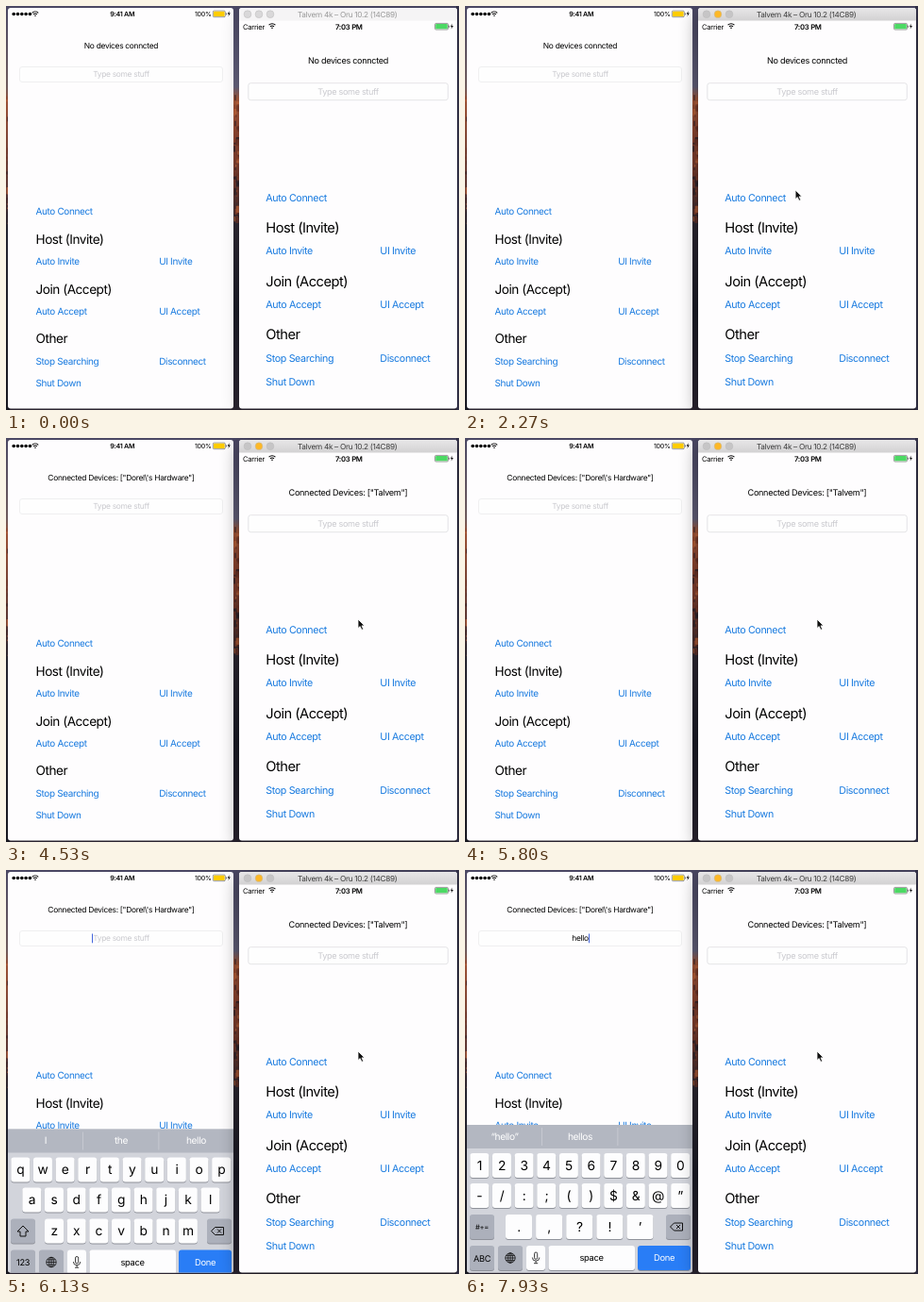
Recreate the animation shown at these times as an HTML page. Size 480x428 px, loop 8000 ms.

```html
<!DOCTYPE html>
<html lang="en">
<head>
<meta charset="utf-8">
<title>Auto connect demo</title>
<style>
  html, body { margin: 0; width: 100%; height: 100%; overflow: hidden; background: #1c1d29; }
  svg { display: block; width: 480px; height: 428px; }
  text { font-family: Inter, "Liberation Sans", sans-serif; letter-spacing: -.035em; text-rendering: geometricPrecision; white-space: pre; }
</style>
</head>
<body>
<svg id="stage" viewBox="0 0 480 428"></svg>
<script>
const LOOP = 8000;
const BLUE = '#1679df', HINT = '#c9c9ce';
const DEVICE = 'Talvem', OWNER = 'Dorel';

// Times in ms
const ACTIVATE = 1900, CONNECT = 3600, KEYBOARD_UP = 5830, SYMBOLS = 7700;
const PRESSES = [['h', 6440, 6530], ['e', 6710, 6800], ['l', 6970, 7080], ['l', 7180, 7270], ['o', 7400, 7490]];
const POINTER = [[950, 484, 120], [1450, 390, 180], [1800, 326, 203], [2050, 326, 203],
                 [2270, 350, 195], [2600, 373, 192]];
const SUGGESTIONS = [['I', 'the', 'hello'], ['“h”', 'hey', 'hello'], ['“he”', 'hello', 'hey'],
                     ['“hel”', 'hello', 'help'], ['“hell”', 'hello', 'hell'], ['“hello”', 'hellos', '']];

const escapeText = s => s.replace(/&/g, '&amp;').replace(/</g, '&lt;');
const text = (x, y, size, s, fill = '#000', attrs = '') =>
  `<text x="${x}" y="${y}" font-size="${size}" fill="${fill}" ${attrs}>${escapeText(s)}</text>`;
const centered = (x, y, size, s, fill, attrs = '') => text(x, y, size, s, fill, 'text-anchor="middle" ' + attrs);
const rect = (x, y, w, h, fill, r = 0, attrs = '') =>
  `<rect x="${x}" y="${y}" width="${w}" height="${h}" rx="${r}" fill="${fill}" ${attrs}/>`;
const circle = (x, y, r, fill, attrs = '') => `<circle cx="${x}" cy="${y}" r="${r}" fill="${fill}" ${attrs}/>`;
const path = (d, fill, attrs = '') => `<path d="${d}" fill="${fill}" ${attrs}/>`;
const gradient = (id, stops) => `<linearGradient id="${id}" x2="0" y2="1">` +
  stops.map(([at, color]) => `<stop offset="${at}" stop-color="${color}"/>`).join('') + '</linearGradient>';

const wifi = (x, y, s) => `<g transform="translate(${x} ${y}) scale(${s})" fill="none" stroke="#000" stroke-width="1.2">
  <path d="M-3.8-1.2a5.4 5.4 0 0 1 7.6 0M-2.2.6a3.1 3.1 0 0 1 4.4 0"/>${circle(0, 2.2, 0.9, '#000', 'stroke="none"')}</g>`;
const battery = (x, y, w, h, color) =>
  rect(x, y, w, h, '#fff', 1.2, 'stroke="#555" stroke-width=".6"') +
  rect(x + 0.7, y + 0.7, w - 1.4, h - 1.4, color, 0.6) +
  rect(x + w + 0.6, y + h / 2 - 1, 0.8, 2, '#555') +
  path(`M${x + w + 4.6} ${y}l-2.3 3.4h1.6l-.8 2.8 2.4-3.7h-1.7z`, '#000');

// Rocky speckle on the strips of wallpaper between the windows
function rocks() {
  let seed = 7;
  const random = () => (seed = seed * 16807 % 2147483647) / 2147483647;
  const colors = ['#c4683c', '#8f4229', '#3a2428', '#6d3327', '#20202b'];
  return Array.from({ length: 70 }, () => {
    const y = 94 + 136 * random();
    return rect((random() < 0.3 ? 0 : 241) + 4 * random(), y, 1 + 3 * random(), 2 + 6 * random(),
      colors[Math.floor(random() * colors.length)], 0.8, 'opacity=".7"');
  }).join('');
}

function screen({ left, right, rows, button, heading, label, mid, labelY, field, connected, id }) {
  const line = (i, x, s) => text(x, rows[i] + button * 0.36, button, s, BLUE);
  const head = (i, s) => text(left, rows[i] + heading * 0.36, heading, s);
  const [fx, fy, fw, fh, stroke] = field;
  return centered(mid, labelY, label, 'No devices conncted', '#000', `id="${id}Idle"`) +
    centered(mid, labelY, label, connected, '#000', `id="${id}Linked"`) +
    rect(fx, fy, fw, fh, '#fefefe', 2.5, `stroke="${stroke}" stroke-width=".8"`) +
    centered(mid, fy + fh / 2 + label * 0.34, label, 'Type some stuff', HINT, `id="${id}Hint"`) +
    line(0, left, 'Auto Connect') +
    head(1, 'Host (Invite)') + line(2, left, 'Auto Invite') + line(2, right, 'UI Invite') +
    head(3, 'Join (Accept)') + line(4, left, 'Auto Accept') + line(4, right, 'UI Accept') +
    head(5, 'Other') + line(6, left, 'Stop Searching') + line(6, right, 'Disconnect') +
    line(7, left, 'Shut Down');
}

// Keyboard, drawn at its resting place
const ROW_Y = [300, 332, 365, 398], KEY_H = 26, PITCH = 23.65;
const keyCap = (x, y, w, fill = '#fdfdfe') =>
  rect(x, y + 0.9, w, KEY_H, '#8f929a', 3) + rect(x, y, w, KEY_H, fill, 3);
const keyRow = (chars, firstX, row, pitch = PITCH, w = 20) => [...chars].map((c, i) => {
  const x = firstX + i * pitch;
  return keyCap(x - w / 2, ROW_Y[row], w) + centered(x, ROW_Y[row] + 17.8, 13.8, c);
}).join('');

function keyCenter(c) {
  const rows = [['qwertyuiop', 15.3], ['asdfghjkl', 27.3], ['zxcvbnm', 51]];
  const row = rows.findIndex(([chars]) => chars.includes(c));
  return [rows[row][1] + rows[row][0].indexOf(c) * PITCH, ROW_Y[row]];
}

const GREY = '#acb0bb';
const icon = 'stroke="#111" stroke-width="1" stroke-linejoin="round"';
const keyboard = `<g id="keyboard">
  ${rect(2, 270, 240, 160, '#d2d4db')}${rect(2, 270, 240, 25, '#b3b7c1')}
  ${rect(81, 273, 0.8, 19, '#cbced5')}${rect(161.5, 273, 0.8, 19, '#cbced5')}
  ${[42, 122, 201.5].map((x, i) => centered(x, 286, 10.2, '', '#fff', `id="suggest${i}"`)).join('')}
  ${keyCap(5, ROW_Y[2], 26, GREY)}${keyCap(213, ROW_Y[2], 26, GREY)}
  ${path('M221.5 374h9v8h-9l-4-4zM224 376l4 4m0-4l-4 4', 'none', icon)}
  <g id="letters">${keyRow('qwertyuiop', 15.3, 0)}${keyRow('asdfghjkl', 27.3, 1)}${keyRow('zxcvbnm', 51, 2)}
    ${path('M18 372.5l6 6h-3v5h-6v-5h-3z', 'none', icon)}</g>
  <g id="symbols">${keyRow('1234567890', 15.3, 0)}${keyRow('-/:;()$&@”', 15.3, 1)}${keyRow('.,?!’', 57, 2, 32.1, 28)}
    ${centered(18, 381, 7.6, '#+=')}</g>
  ${keyCap(5, ROW_Y[3], 26, GREY)}${centered(18, 414.5, 9.2, '', '#000', 'id="mode"')}
  ${keyCap(35, ROW_Y[3], 26, GREY)}
  <g fill="none" stroke="#111" stroke-width=".8">${circle(48, 411, 5.2, 'none')}
    <ellipse cx="48" cy="411" rx="2.4" ry="5.2"/><path d="M42.8 411h10.4M48 405.8v10.4M43.6 408.4h8.8M43.6 413.6h8.8"/></g>
  ${keyCap(65, ROW_Y[3], 20)}${rect(73.5, 405, 3.2, 7.3, 'none', 1.6, 'stroke="#111" stroke-width=".8"')}
  ${path('M71.4 410.5a3.7 3.7 0 0 0 7.4 0M75.1 414.2v2.3M73 416.7h4.2', 'none', 'stroke="#111" stroke-width=".8"')}
  ${keyCap(88.5, ROW_Y[3], 91.5)}${centered(134, 414.3, 9.4, 'space')}
  ${keyCap(183, ROW_Y[3], 56, '#297df6')}${centered(211, 414.3, 9.4, 'Done', '#fff')}
  <g id="popup" style="filter:drop-shadow(0 .5px 1px rgba(0,0,0,.25))">
    ${path('M-14-35h28q4 0 4 4v18q0 4-4 7t-4 6v23q0 3-3 3h-14q-3 0-3-3V0q0-3-4-6t-4-7v-18q0-4 4-4z', '#fdfdfe')}
    ${centered(0, -12, 21, '', '#000', 'id="popupChar"')}</g>
</g>`;

document.getElementById('stage').innerHTML = `<defs>
  ${gradient('edge', [[0, '#4a4763'], [0.2, '#6d5a5c'], [0.24, '#9a4f34'], [0.45, '#5a3532'], [0.55, '#23232f'], [1, '#17171f']])}
  ${gradient('gap', [[0, '#4a4763'], [0.2, '#62607a'], [0.23, '#a4583a'], [0.32, '#8c4430'], [0.43, '#70392d'], [0.54, '#2c2731'], [0.75, '#1b1c27'], [1, '#2a2430']])}
  ${gradient('bar', [[0, '#e8e7e8'], [1, '#d2d1d2']])}
  <clipPath id="leftClip">${rect(2, 2, 239, 424.5, '#fff', 3)}</clipPath>
  <clipPath id="rightClip">${rect(247, 2, 231, 424.5, '#fff', 3)}</clipPath></defs>
${rect(0, 0, 480, 428, 'url(#gap)')}${rect(0, 0, 4, 428, 'url(#edge)')}${rect(477, 0, 3, 428, '#34324a')}${rocks()}
<g clip-path="url(#leftClip)">
  ${rect(2, 2, 239, 425, '#fefdfe')}
  ${[0, 1, 2, 3, 4].map(i => circle(8.2 + i * 4.3, 8.5, 1.8, '#000')).join('')}${wifi(31, 8.3, 0.85)}
  ${centered(123.3, 11, 7.1, '9:41 AM', '#000', 'font-weight="600"')}${text(200, 11, 7, '100%')}
  ${battery(219.3, 5.1, 13, 6.6, '#fc0')}
  ${screen({ id: 'left', left: 31.5, right: 162.3, rows: [217.5, 247, 270.5, 300, 323.5, 352.5, 376.5, 399.7],
    button: 9.95, heading: 13.6, label: 8.4, mid: 122, labelY: 45, field: [14.5, 64.5, 215, 16, '#ececee'],
    connected: `Connected Devices: ["${OWNER}\\'s Hardware"]` })}
  ${centered(122, 75.4, 8.4, '', '#000', 'id="typed"')}${rect(0, 67.5, 1, 9.8, '#4466dd', 0, 'id="caret"')}
  ${keyboard}
</g>
${rect(247, 8, 231, 425, '#000', 3, 'id="shadow" style="filter:blur(10px)"')}
<g clip-path="url(#rightClip)">
  ${rect(247, 2, 231, 425, '#fefdfe')}
  ${rect(247, 2, 231, 13.5, '#f5f4f5', 0, 'id="titleBar"')}
  ${[256, 268, 280].map((x, i) => circle(x, 8.7, 3.9, '#d9d8d9', `id="light${i}" stroke="#bbb" stroke-width=".5"`)).join('')}
  ${centered(361.7, 11.7, 8.2, DEVICE + ' 4k – Oru 10.2 (14C89)', '#999', 'id="title"')}
  ${text(251, 24.5, 7.6, 'Carrier')}${wifi(282, 21.3, 0.9)}
  ${centered(363.3, 24.5, 7.7, '7:03 PM', '#000', 'font-weight="600"')}
  ${battery(454.5, 18.4, 14, 6.6, '#4cd964')}
  ${screen({ id: 'right', left: 275.3, right: 396.3, rows: [202.8, 234.3, 259.6, 291.3, 316.6, 348, 373.2, 398.3],
    button: 10.7, heading: 14.7, label: 9.1, mid: 362.5, labelY: 61, field: [256.8, 81.7, 211.5, 18, '#dedee0'],
    connected: `Connected Devices: ["${DEVICE}"]` })}
</g>
${path('M0 0v9.6l2.2-2 1.7 3.7 1.8-.8-1.7-3.6h3z', '#111', 'id="pointer" stroke="#fff" stroke-width=".8"')}`;

const ui = {};
document.querySelectorAll('#stage [id]').forEach(node => ui[node.id] = node);
const show = (node, on) => node.setAttribute('visibility', on ? 'visible' : 'hidden');
const move = (node, x, y) => node.setAttribute('transform', `translate(${x} ${y})`);

function pointerAt(t) {
  const next = POINTER.findIndex(p => p[0] > t);
  if (next < 0) return POINTER[POINTER.length - 1].slice(1);
  if (next === 0) return [-50, -50];
  const [t0, x0, y0] = POINTER[next - 1], [t1, x1, y1] = POINTER[next];
  const k = (t - t0) / (t1 - t0);
  return [x0 + (x1 - x0) * k, y0 + (y1 - y0) * k];
}

function draw(t) {
  const active = t >= ACTIVATE, linked = t >= CONNECT, editing = t >= KEYBOARD_UP;
  ui.shadow.setAttribute('opacity', active ? 0.45 : 0.18);
  ui.titleBar.setAttribute('fill', active ? 'url(#bar)' : '#f5f4f5');
  ui.title.setAttribute('fill', active ? '#3c3c3c' : '#999');
  ui.light1.setAttribute('fill', active ? '#fdb827' : '#d9d8d9');
  for (const light of [ui.light0, ui.light2]) light.setAttribute('fill', active ? '#c6c5c6' : '#d9d8d9');
  for (const side of ['left', 'right']) {
    show(ui[side + 'Idle'], !linked);
    show(ui[side + 'Linked'], linked);
  }
  move(ui.pointer, ...pointerAt(t));

  const typed = PRESSES.filter(p => t >= p[2]).map(p => p[0]).join('');
  ui.typed.textContent = typed;
  show(ui.leftHint, !typed);
  show(ui.caret, editing);
  ui.caret.setAttribute('x', typed ? 122.3 + ui.typed.getComputedTextLength() / 2 : 91);

  // Critically damped spring
  const s = 0.018 * Math.max(0, t - KEYBOARD_UP);
  move(ui.keyboard, 0, 158 * (1 + s) * Math.exp(-s));
  show(ui.keyboard, editing);
  if (!editing) {
    for (const part of [ui.letters, ui.symbols, ui.popup]) show(part, false);
    return;
  }
  const symbols = t >= SYMBOLS;
  show(ui.letters, !symbols);
  show(ui.symbols, symbols);
  ui.mode.textContent = symbols ? 'ABC' : '123';
  SUGGESTIONS[typed.length].forEach((word, i) => ui['suggest' + i].textContent = word);
  const press = PRESSES.find(p => t >= p[1] && t < p[2]);
  show(ui.popup, press);
  if (press) {
    move(ui.popup, ...keyCenter(press[0]));
    ui.popupChar.textContent = press[0];
  }
}

const start = performance.now();
function frame() {
  draw((performance.now() - start) % LOOP);
  requestAnimationFrame(frame);
}
frame();
</script>
</body>
</html>
```
